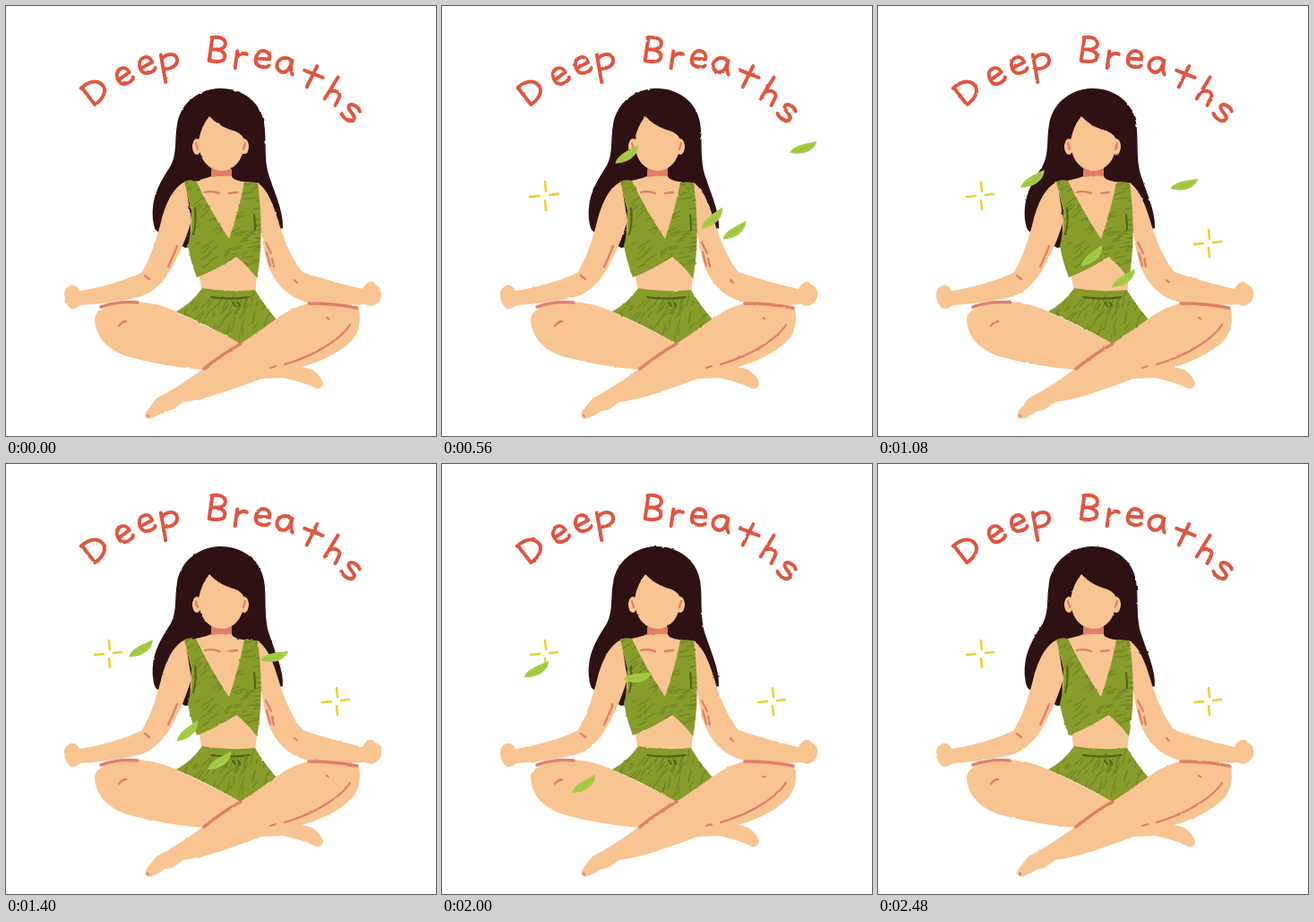
An HTML page for the animation above (2520 ms loop, 480 by 480 pixels).

```html
<!DOCTYPE html>
<html lang="en">
<head>
<meta charset="utf-8">
<title>Deep Breaths</title>
<style>
html, body { margin: 0; width: 100%; height: 100%; overflow: hidden; background: #fff; }
svg { display: block; width: 100vw; height: 100vh; }
.skin { fill: #f8c491; }
.hair { fill: #2e1213; }
.cloth { fill: #889c2c; }
.blush { fill: none; stroke: #e0806a; stroke-width: 2.3; stroke-linecap: round; }
.bold { stroke-width: 3.6; }
.seam { fill: none; stroke: #4f6516; stroke-width: 2; stroke-linecap: round; }
.hatch { fill: none; stroke: #708525; stroke-width: 1.3; stroke-linecap: round; }
.letters { fill: none; stroke: #e0553f; stroke-width: 4; stroke-linecap: round; stroke-linejoin: round; }
.leaf { fill: #a5cb45; }
.vein { fill: none; stroke: #97bd3a; stroke-width: 0.8; }
.spark { fill: none; stroke: #ead02c; stroke-width: 2.5; stroke-linecap: round; }
</style>
</head>
<body>
<svg viewBox="0 0 480 480" role="img" aria-label="Deep Breaths">
  <defs>
    <filter id="boil" x="0" y="0" width="480" height="480" filterUnits="userSpaceOnUse" color-interpolation-filters="sRGB">
      <feTurbulence id="noise" type="fractalNoise" baseFrequency="0.14" numOctaves="2" seed="1"/>
      <feDisplacementMap in="SourceGraphic" scale="2" xChannelSelector="R" yChannelSelector="G"/>
    </filter>
    <path id="top" d="M199,196 Q205,193 212,195 Q228,229 249,260 Q260,228 266,197 Q274,195 281,198 Q286,235 284,268 Q283,290 280,304 Q270,290 257,280 Q236,294 213,303 Q206,285 203,267 Q209,249 207,228 Z"/>
    <path id="shorts" d="M219,315 Q248,320 278,317 Q288,334 302,350 Q283,365 262,377 Q227,357 190,341 Q207,332 219,315 Z"/>
    <clipPath id="inTop"><use href="#top"/></clipPath>
    <clipPath id="inShorts"><use href="#shorts"/></clipPath>
  </defs>

  <g filter="url(#boil)">
    <path class="hair" d="M238,92 C215,93 195,108 191,132 C188,150 191,164 184,178 C172,197 162,212 164,238 Q165,248 168,251 L200,270 L300,250 L309,248 C310,228 299,208 292,184 C288,163 291,148 288,130 C284,106 262,91 238,92 Z"/>

    <!-- neck, shoulders and torso -->
    <path class="skin" d="M230,176 L229,190 Q220,194 199,197 L207,228 L205,267 L216,302 L219,320 L279,320 Q278,310 281,300 L285,268 L283,198 L264,196 Q253,194 252,190 L252,176 Z"/>
    <path d="M230,176 L252,176 L252,190 Q240,189 229,191 Z" fill="#e27c68"/>
    <path class="skin" d="M200,196 C186,203 179,220 174,237 C169,258 161,283 151,298 Q120,312 82,318 C78,309 70,311 66,317 C63,324 67,335 73,338 Q79,338 83,334 Q115,332 148,325 C170,319 183,298 191,280 Q198,268 207,240 Z"/>
    <path class="skin" d="M280,197 C291,203 298,220 304,240 C310,262 321,285 331,297 Q360,307 398,316 C402,308 409,305 412,311 C420,313 421,323 417,329 Q410,338 401,333 Q375,335 343,332 C316,327 301,312 292,288 Q287,270 283,240 Z"/>

    <!-- face -->
    <ellipse class="skin" cx="213" cy="157" rx="5" ry="9"/>
    <ellipse class="skin" cx="266" cy="157" rx="5" ry="9"/>
    <path class="skin" d="M227,123 Q236,133 250,138 Q263,141 266,149 C267,170 255,184 241,184 C225,183 215,171 215,150 Q218,134 227,123 Z"/>
    <path class="blush" d="M212,153 L214,160 M267,153 L265,160"/>

    <!-- legs -->
    <path class="skin" d="M291,403 Q326,400 342,406 Q352,413 354,421 Q353,428 346,427 Q330,419 309,415 L285,416 Z"/>
    <path class="skin" d="M99,349 C101,338 113,335 130,331 Q158,327 190,341 L262,376 L220,406 Q175,402 138,392 C112,384 99,368 99,349 Z"/>
    <use href="#shorts" class="cloth"/>
    <g id="shortsHatch" class="hatch" clip-path="url(#inShorts)"></g>
    <path class="skin" d="M262,377 Q284,362 302,349 Q322,334 343,331 Q371,330 394,338 C397,354 393,369 382,377 C361,396 325,406 300,410 Q268,423 240,432 Q216,440 198,442 C191,447 186,452 178,452 Q166,460 159,461 Q153,459 157,452 L168,438 Q190,427 220,405 Z"/>

    <use href="#top" class="cloth"/>
    <g id="topHatch" class="hatch" clip-path="url(#inTop)"></g>
    <path class="seam" d="M211,226 Q213,240 209,255 M277,233 Q278,242 278,250 M229,325 Q250,328 272,325 M253,331 L256,335 M259,331 L261,335"/>

    <path class="blush" d="M222,208 Q230,206 238,209 M249,209 L258,208 M191,268 Q187,279 181,291 M155,301 L160,305 M290,264 L296,276 M291,275 L295,290 M297,282 L299,291 M322,306 L325,309 M126,357 Q130,352 134,352 M295,404 L301,402 M311,400 Q339,392 360,378 Q377,367 384,356 M358,348 L360,349 M158,457 L159,458"/>
    <path class="blush bold" d="M106,336 Q125,329 147,331 M221,405 Q242,388 262,377 M338,332 Q366,332 392,337"/>
    <g id="letters" class="letters"></g>
  </g>
  <g id="sparks" class="spark"></g>
  <g id="leaves"></g>
</svg>

<script>
const LOOP = 2520, STEP = 40;
const byId = id => document.getElementById(id);

function add(parent, tag, attrs) {
  const node = document.createElementNS('http://www.w3.org/2000/svg', tag);
  for (const key in attrs) node.setAttribute(key, attrs[key]);
  return parent.appendChild(node);
}

function randomFrom(seed) {
  return () => (seed = seed * 16807 % 2147483647) / 2147483647;
}

// Hand lettering: stroke, centre and tilt of each letter
const e = 'M-7,1 L7,-1 C7,-6 4,-9 0,-9 C-5,-9 -8,-5 -8,1 C-8,7 -4,9 1,9 C4,9 7,8 8,6';
[
  ['M-9,-12 L-9,12 M-10,-12 C4,-13 11,-7 11,1 C11,8 2,13 -9,12', 99, 95, -38],
  [e, 132, 78, -28],
  [e, 157, 66, -20],
  ['M-8,-13 L-8,18 M-8,-8 C-2,-14 9,-13 9,-5 C9,2 0,5 -7,3', 183, 66, -10],
  ['M-8,-13 L-9,13 M-9,-13 C2,-16 8,-12 7,-6 C6,-1 0,0 -7,0 C4,-1 9,3 8,8 C7,13 -2,14 -9,13', 237, 49, 6],
  ['M-5,-9 L-5,10 M-5,-1 C-3,-6 2,-9 6,-7', 262, 60, 8],
  [e, 287, 59, 12],
  ['M7,-5 C4,-10 -5,-9 -8,-2 C-10,5 -4,9 1,8 C5,6 7,0 7,-7 Q7,4 11,8', 311, 66, 14],
  ['M0,-13 L-1,13 M-11,-3 L11,-4', 342, 79, 24],
  ['M-7,-16 L-7,12 M-7,4 C-4,-3 5,-4 6,2 L7,12', 368, 97, 32],
  ['M7,-7 C2,-11 -7,-9 -6,-4 C-5,0 7,-1 7,4 C7,10 -3,10 -8,7', 385, 119, 36],
].forEach(([d, x, y, tilt]) =>
  add(byId('letters'), 'path', { d, transform: `translate(${x} ${y}) rotate(${tilt})` }));

function hatch(id, count, x, y, w, h, slopeAt, seed) {
  const rnd = randomFrom(seed);
  let d = '';
  for (let i = 0; i < count; i++) {
    const px = x + rnd() * w, py = y + rnd() * h;
    const angle = slopeAt(px) + (rnd() - 0.5) * 0.4, len = 5 + rnd() * 9;
    d += `M${px},${py} l${len * Math.cos(angle)},${len * Math.sin(angle)} `;
  }
  add(byId(id), 'path', { d });
}
hatch('topHatch', 105, 198, 198, 86, 104, x => x < 250 ? -0.65 : -0.25, 71);
hatch('shortsHatch', 75, 192, 328, 106, 45, x => x < 245 ? -0.9 : -1.2, 29);

// Leaf path points: time, x, y
const leaves = [
  { tilt: [-20, -11], fade: [250, 450, 2250, 2440],
    path: [[200, 440, 112], [360, 423, 134], [800, 377, 181], [1400, 299, 214], [1760, 254, 230], [2000, 218, 237], [2440, 152, 245]] },
  { tilt: [-36, -30], fade: [220, 480, 2300, 2470],
    path: [[200, 228, 138], [360, 218, 152], [800, 191, 180], [1400, 150, 206], [1760, 125, 219], [2000, 105, 229], [2440, 66, 243]] },
  { tilt: [-35, -35], fade: [250, 450, 2180, 2400],
    path: [[200, 357, 203], [360, 344, 226], [800, 303, 277], [1400, 238, 331], [1760, 195, 350], [2000, 158, 357], [2440, 92, 362]] },
  { tilt: [-42, -42], fade: [250, 450, 1440, 1660],
    path: [[200, 344, 197], [360, 326, 216], [800, 271, 259], [1400, 202, 298], [1760, 164, 315]] },
];
for (const leaf of leaves) {
  leaf.node = add(byId('leaves'), 'g', {});
  add(leaf.node, 'path', { class: 'leaf', d: 'M-16,1 C-9,-5 1,-3 17,-1 C10,9 -4,9 -16,1 Z' });
  add(leaf.node, 'path', { class: 'vein', d: 'M-12,1 Q0,3 12,1' });
}

const sparks = [[115, 212, 180], [369, 265, 600]].map(([x, y, start]) => ({
  x, y, start,
  node: add(byId('sparks'), 'path', { d: 'M0,-15 L1,-5 M0,5 L1,15 M-16,1 L-6,0 M5,-1 L14,-2' }),
}));

const clamp = v => Math.max(0, Math.min(1, v));
const ramp = (t, a, b) => clamp((t - a) / (b - a));

// Smooth curve through timed points
function along(points, t) {
  const last = points.length - 1;
  let i = 0;
  while (i < last - 1 && t > points[i + 1][0]) i++;
  const p = points[i], q = points[i + 1], span = q[0] - p[0];
  const u = clamp((t - p[0]) / span);
  const slope = (k, axis) => {
    const a = points[Math.max(0, k - 1)], b = points[Math.min(last, k + 1)];
    return (b[axis] - a[axis]) / (b[0] - a[0]) * span;
  };
  return [1, 2].map(axis =>
    p[axis] * (1 + 2 * u) * (1 - u) ** 2 + q[axis] * u * u * (3 - 2 * u) +
    slope(i, axis) * u * (1 - u) ** 2 - slope(i + 1, axis) * u * u * (1 - u));
}

function draw() {
  const step = Math.floor(performance.now() % LOOP / STEP), t = step * STEP;
  byId('noise').setAttribute('seed', step + 1);

  for (const { node, path, tilt, fade } of leaves) {
    const [x, y] = along(path, t);
    const angle = tilt[0] + (tilt[1] - tilt[0]) * ramp(t, 360, 2000);
    node.setAttribute('transform', `translate(${x} ${y}) rotate(${angle})`);
    node.setAttribute('opacity', ramp(t, fade[0], fade[1]) * (1 - ramp(t, fade[2], fade[3])));
  }
  for (const { node, x, y, start } of sparks) {
    const grow = ramp(t, start, start + 200);
    const size = grow * (1.15 - 0.15 * ramp(t, start + 200, start + 500));
    node.setAttribute('transform', `translate(${x} ${y}) scale(${size})`);
    node.setAttribute('opacity', grow);
  }
  requestAnimationFrame(draw);
}
draw();
</script>
</body>
</html>
```
